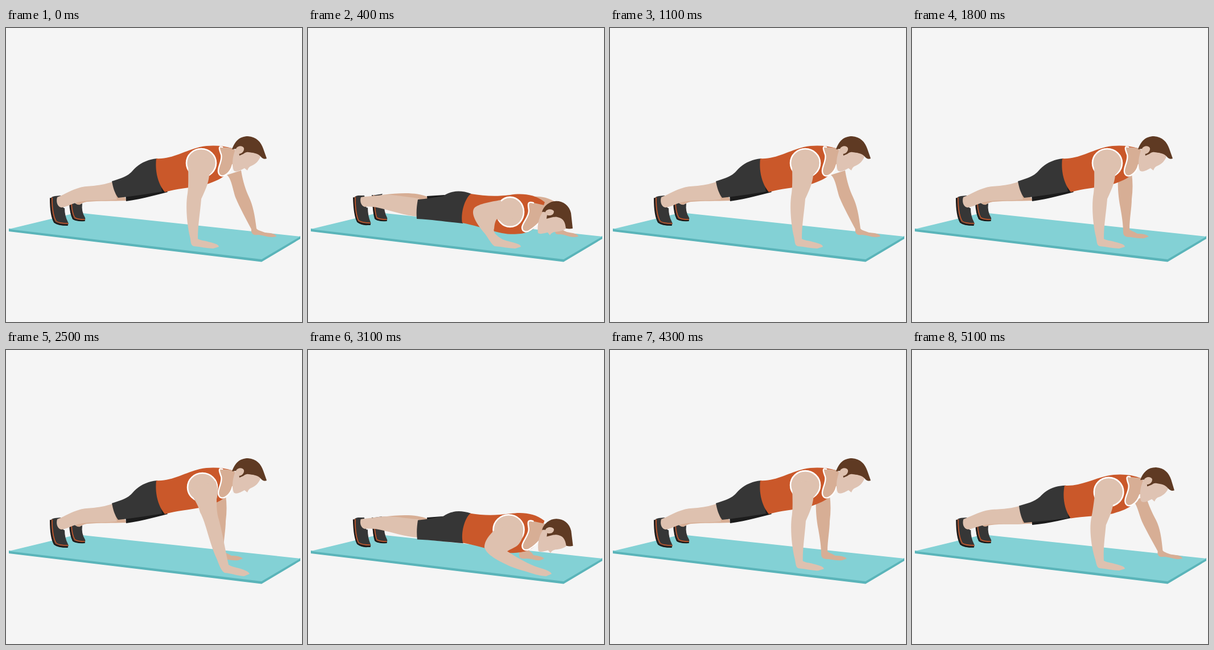
Write an HTML page that moves like this. It is 520 px wide and 516 px high and loops after 5.2 s.

```html
<!DOCTYPE html>
<html lang="en">
<head>
<meta charset="utf-8">
<title>Push-ups</title>
<style>
  html, body { margin: 0; height: 100%; overflow: hidden; background: #f5f5f5; }
  svg { display: block; width: 520px; height: 516px; }
</style>
</head>
<body>
<svg id="stage" viewBox="0 0 520 516">
  <path fill="#5ab4b9" d="M5 352L449 405L517 365V370L449 410.5L5 357Z"/>
  <path fill="#83d1d5" d="M5 353L125 324L517 366L449 406Z"/>
</svg>
<script>
const LOOP = 5200, STEP = 100, HALF = 2500;
const SKIN = '#dec1af', SHADE = '#d7ae95', ORANGE = '#ca582a', DARK = '#363636', SOLE = '#1d1614';
const stage = document.getElementById('stage');
const NUM = /-?\d+(?:\.\d+)?/g;
const parts = [];
let lean = 0; // how far the following parts swing forward on the way down

function mix(a, b, k) {
  const to = b.match(NUM);
  let i = 0;
  return a.replace(NUM, n => +(+n + (to[i++] - n) * k).toFixed(2));
}

// poses: [up, down] or, for arms, [wide up, wide down, narrow up, narrow down]
function part(attrs, poses, arm) {
  const el = document.createElementNS('http://www.w3.org/2000/svg', 'path');
  for (const key in attrs) el.setAttribute(key, attrs[key]);
  stage.append(el);
  parts.push({ el, poses, arm, lean });
}
const fill = (color, ...poses) => part({ fill: color }, poses);
const line = (color, width, ...poses) =>
  part({ fill: 'none', stroke: color, 'stroke-width': width, 'stroke-linecap': 'round' }, poses);

// far leg and shoe
fill(DARK,
  'M112 307L119 305Q122 309 127 310Q131 309 134 308Q132 322 139 333Q141 339 132 338Q122 339 117 335Q112 322 112 307Z',
  'M113 294L131 291Q126 298 130 304Q132 308 134 308Q133 322 139 333Q141 339 132 338Q122 339 117 335Q113 322 113 294Z');
line(SOLE, 2,
  'M112 307Q113 326 118 335Q124 339 138 338',
  'M113 294Q115 325 119 335Q124 339 138 338');
line(ORANGE, 1.5,
  'M115 307Q116 325 121 333Q126 336 138 336',
  'M116 294Q117 323 121 333Q126 336 138 336');
fill(SHADE,
  'M120 304C122 309 126 311 130 310C133 308 136 306 142 305C165 303 185 304 212 303L205 290C180 290 160 288 130 292Z',
  'M124 296C126 302 128 306 132 308C140 309 150 312 160 316C175 320 195 318 212 316L212 297C190 288 165 289 130 293Z');
fill('#1c1c1c',
  'M209 280L211 304C235 301 260 294 284 288L270 270Z',
  'M209 295L212 326C235 328 260 332 272 333L240 293Z');

part({ fill: SHADE }, [
  'M388 258C396 264 398 282 403 297C411 316 422 336 431 353C430 362 436 364 442 363C450 363 458 367 468 367L475 366C474 361 465 360 455 359C447 356 442 355 440 352C437 328 434 312 427 297C420 282 416 268 413 250Z',
  'M388 305C392 310 400 320 410 326C420 335 430 345 436 354C432 360 436 363 442 362C450 362 458 367 468 367L475 366C474 361 465 360 455 358C449 356 445 353 443 350C446 338 448 322 440 310C430 300 412 295 398 296Z',
  'M362 265C361 280 363 300 366 315C369 332 371 345 371 358C371 366 376 367 384 367C392 368 400 370 408 369L416 366C412 362 404 361 396 361C390 357 384 356 382 353C382 335 386 315 386 300C388 285 388 270 386 255Z',
  'M368 330C362 338 364 345 368 350C370 353 371 356 371 360C371 366 376 367 384 366C392 366 400 370 408 369L415 366C411 362 402 361 396 360C394 356 391 354 388 352C392 345 392 340 390 335C388 330 385 325 380 320Z'
], 'far');

// near shoe and leg
fill(DARK,
  'M78 300Q79 296 86 295L96 294L100 311Q100 317 103 316Q103 330 109 341Q112 346 104 346Q92 347 85 341Q78 325 78 300Z',
  'M80 300Q81 295 88 294L99 294L102 311Q102 317 105 315Q105 330 110 341Q112 346 105 346Q94 347 87 341Q80 325 80 300Z');
line(SOLE, 2,
  'M78 299Q78 329 85 341Q91 346 108 346',
  'M80 298Q81 329 87 340Q93 345 109 345');
line(ORANGE, 1.6,
  'M81 298Q81 327 88 339Q93 343 109 343',
  'M83 297Q83 327 89 338Q95 342 109 342');
fill(SKIN,
  'M90 297C105 291 115 284 130 280C145 276 160 279 187 270L195 301C170 304 150 301 130 305C115 308 105 315 97 315C89 313 88 303 90 297Z',
  'M93 297C105 295 115 295 130 293C150 292 165 296 195 299L193 331C170 329 150 322 130 317C118 314 108 313 100 314C92 312 91 302 93 297Z');

// shorts, shirt and neck
lean = 8;
fill(DARK,
  'M186 269C200 264 212 262 222 251C232 240 245 231 266 229L274 287C250 291 225 295 197 298C191 290 188 280 186 269Z',
  'M193 301C208 300 222 297 238 295C248 287 266 283 287 291L272 343C250 341 225 337 191 335C190 322 191 312 193 301Z');
fill(ORANGE,
  'M264 229C290 231 315 215 340 209C360 205 380 206 400 212L396 246C385 262 372 268 350 275C320 281 300 282 279 288C264 270 262 245 264 229Z',
  'M286 291C310 295 330 296 355 293C375 290 398 291 416 306L402 345C395 358 380 362 360 362C335 362 310 350 271 342C268 325 275 300 286 291Z');
fill(SHADE,
  'M380 209C372 206 375 214 378 222C381 232 372 243 373 252C374 261 382 261 387 257C393 253 396 248 398 240L408 225L400 211Z',
  'M396 307C384 303 387 312 388 320C389 331 377 341 376 350C376 359 385 359 390 355C397 351 401 347 407 341L424 328L418 312Z');
line('#fff', 2.4,
  'M380 209C372 206 375 214 378 222C381 232 372 243 373 252C374 261 382 261 387 257C393 253 396 248 398 240',
  'M396 307C384 303 387 312 388 320C389 331 377 341 376 350C376 359 385 359 390 355C397 351 401 347 407 341');

// head
lean = 16;
fill('#dfc3b3',
  'M404 210C398 225 396 240 400 250C404 254 412 250 419 246L424 250C426 245 428 243 431 242C438 239 445 233 447 225L440 212L415 205Z',
  'M417 318C406 328 402 345 404 360C408 363 416 360 421 359L425 364C428 359 432 358 436 358C444 357 452 355 455 350L448 330L425 315Z');
fill('#5f3a23',
  'M397 213C402 199 410 190 425 190C440 191 448 200 452 212L458 229C454 231 450 229 447 225C441 219 433 219 426 218C421 217 419 220 417 221L410 224L409 216L404 212Z',
  'M411 323C414 313 424 304 436 304C449 304 459 312 462 325L465 352C461 353 457 353 453 352C452 342 449 335 441 333C436 331 433 332 431 332L419 335L420 328L416 323Z');
fill(SKIN,
  'M404 212C407 206 416 206 418 211C419 216 414 221 409 221C405 220 403 216 404 212Z',
  'M417 323C419 317 430 317 432 322C432 328 427 330 421 329C417 328 416 326 417 323Z');

// near shoulder and arm
lean = 8;
part({ fill: SKIN, stroke: '#fff', 'stroke-width': 2.6 }, [
  'M317 237a26 25 0 1 0 52 0a26 25 0 1 0 -52 0',
  'M331 323a24 26 0 1 0 48 0a24 26 0 1 0 -48 0',
  'M319 241a26 25 0 1 0 52 0a26 25 0 1 0 -52 0',
  'M325 315a27 26 0 1 0 54 0a27 26 0 1 0 -54 0'
], 'near');
lean = 0;
part({ fill: SKIN }, [
  'M320 232C320 255 321 275 319 290C315 312 318 345 323 366C325 374 324 382 330 383C342 384 355 387 364 387L374 384C374 379 362 377 355 375C348 373 342 373 337 370C337 345 341 325 343 300C350 285 356 272 357 258C366 250 369 238 366 228Z',
  'M338 302C322 305 300 308 292 316C285 326 297 345 310 360C318 370 322 380 328 383C342 384 355 387 364 387L374 384C374 379 362 377 355 375C348 373 342 372 337 368C328 362 325 356 327 352C328 340 330 338 332 335C345 345 355 345 360 335Z',
  'M322 245C330 262 338 272 341 285C352 305 356 335 370 366C374 376 378 388 384 391C396 392 405 396 418 397L428 393C426 388 416 385 409 383C402 381 396 380 391 377C386 355 380 320 374 298C370 285 370 275 370 262C373 250 372 240 368 230Z',
  'M330 313C318 325 310 335 310 346C314 360 335 370 356 380C366 384 376 387 384 389C396 393 405 396 418 397L428 393C426 388 416 385 409 383C402 381 394 378 386 374C372 367 358 358 350 353C362 346 368 345 372 338C378 330 380 315 374 305Z'
], 'near');

function ease(t, from, to) {
  const k = Math.min(1, Math.max(0, (t - from) / (to - from)));
  return (1 - Math.cos(Math.PI * k)) / 2;
}

function render(t) {
  const beat = t % HALF;
  const depth = ease(beat, 0, 410) - ease(beat, 500, 1100);
  const swing = depth * (1 - depth);
  const narrow = {
    far: ease(t, 1150, 1780) - ease(t, 4300, 4900),
    near: ease(t, 1800, 2450) - ease(t, 3680, 4380)
  };
  for (const { el, poses, arm, lean } of parts) {
    let d = mix(poses[0], poses[1], depth);
    if (arm) d = mix(d, mix(poses[2], poses[3], depth / 0.93), narrow[arm]);
    el.setAttribute('d', d);
    el.setAttribute('transform', `translate(${lean * swing} 0)`);
  }
}

function tick() {
  const t = performance.now() % LOOP;
  render(Math.floor(t / STEP) * STEP);
  requestAnimationFrame(tick);
}
tick();
</script>
</body>
</html>
```
